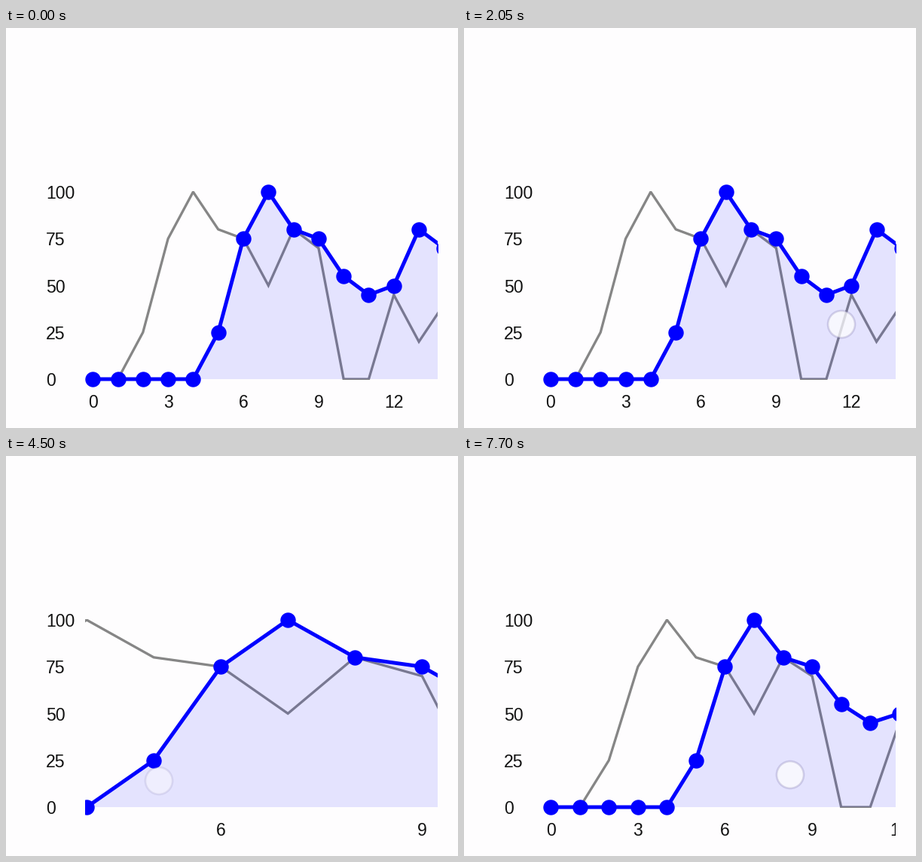
Write a matplotlib script that moves like this. It is 600 px wide and 532 px high and loops after 8000 ms.

```python
import numpy as np
import matplotlib.pyplot as plt
from matplotlib.animation import FuncAnimation
from matplotlib.patches import Circle, Polygon, Rectangle

W, H, DPI = 600, 532, 100
PX = 72 / DPI
STEP, LOOP = 50, 8000
LEFT, RIGHT, TOP, BASE = 105, 573, 218, 467
ORIGIN, GAP, INSET = 115.2, 33.3, 10
COAST = 150  # decay time of a fling, ms

BLUE = [0, 0, 0, 0, 0, 25, 75, 100, 80, 75, 55, 45,
        50, 80, 70, 25, 0, 0, 35, 60, 20, 40, 55, 30]
GREY = [0, 0, 25, 75, 100, 80, 75, 50, 80, 70, 0, 0,
        45, 20, 40, 75, 50, 75, 40, 20, 0, 0, 30, 10]
index = np.arange(len(BLUE))


def flick(u):
    return u * u


def smooth(u):
    return u * u * (3 - 2 * u)


class Touch:
    """A finger moving from a to b between two times."""

    def __init__(self, start, end, a, b, curve=flick, lift=None):
        self.start, self.end, self.curve = start, end, curve
        self.a, self.b = np.array(a, float), np.array(b, float)
        self.lift = lift or end

    def at(self, t):
        u = np.clip((t - self.start) / (self.end - self.start), 0, 1)
        return self.a + (self.b - self.a) * self.curve(u)

    def moved(self, t, stop):
        """Horizontal drag so far, plus the fling after release."""
        dx = self.at(t)[0] - self.a[0]
        speed = 2 * (self.b[0] - self.a[0]) / (self.end - self.start)
        free = max(0, min(t, stop) - self.end)
        return dx + speed * COAST * (1 - np.exp(-free / COAST))

    def level(self, t):
        return (np.clip((t - self.start + 50) / 100, 0, 1)
                * np.clip(1 - (t - self.lift) / 120, 0, 1))


SWIPES = [
    Touch(450, 850, (479, 411), (74, 400)),
    Touch(1500, 2100, (183.5, 397), (561.4, 393.5)),
    Touch(4050, 4450, (503.5, 424), (203, 432)),
    Touch(4900, 5400, (172, 428), (552, 418)),
]
PINCHES = [
    (Touch(3150, 3950, (292, 428), (104.5, 436), smooth),
     Touch(3150, 3950, (467, 397), (572.5, 384), smooth)),
    (Touch(5950, 7450, (125, 436), (246, 440), smooth),
     Touch(5950, 7450, (557, 392), (433, 424), smooth, lift=LOOP)),
]
TOUCHES = SWIPES + [touch for pair in PINCHES for touch in pair]


def zoom(t):
    z = 1
    for left, right in PINCHES:
        z *= (right.at(t)[0] - left.at(t)[0]) / (right.a[0] - left.a[0])
    return z


def pan(t):
    x = 0
    stops = [s.start for s in SWIPES[1:]] + [LOOP]
    for swipe, stop in zip(SWIPES, stops):
        limit = RIGHT - INSET - ORIGIN - index[-1] * GAP * zoom(swipe.start)
        x = np.clip(x + swipe.moved(t, stop), limit, 0)
    return x


def to_y(values):
    return BASE - np.array(values) * (BASE - TOP) / 100


fig = plt.figure(figsize=(W / DPI, H / DPI), dpi=DPI, facecolor="#fefdfe")
ax = fig.add_axes([0, 0, 1, 1])
ax.set(xlim=(0, W), ylim=(H, 0))
ax.axis("off")


def clip(artist, top=0, bottom=H):
    artist.set_clip_path(Rectangle((LEFT, top), RIGHT - LEFT, bottom - top,
                                   transform=ax.transData))
    return artist


def label(x, y, value, ha):
    return ax.text(x, y, str(value), ha=ha, va="baseline", color="#111111",
                   fontfamily="Liberation Sans", fontsize=23 * PX)


for v in range(0, 101, 25):
    label(53, to_y(v) + 9, v, "left")

blue_y, grey_y = to_y(BLUE), to_y(GREY)
grey, = ax.plot(index, grey_y, color="#868686", lw=3.3 * PX,
                solid_joinstyle="miter", zorder=1)
clip(grey, TOP - 1, BASE + 1)
area = clip(ax.add_patch(Polygon([(0, 0), (1, 1), (2, 0)], facecolor="#0000ff",
                                 alpha=.1, lw=0, zorder=2)))
blue, = ax.plot(index, blue_y, "-o", color="#0000ff", lw=5 * PX,
                ms=20.4 * PX, mew=0, solid_joinstyle="round",
                snap=False, zorder=3)
clip(blue)

ticks = []
for n in index[::3]:
    tick = label(0, 505, n, "center")
    tick.set_clip_on(True)
    ticks.append((n, clip(tick)))

fingers = []
for _ in TOUCHES:
    disc = Circle((0, 0), 18, facecolor="white", lw=0, zorder=5)
    ring = Circle((0, 0), 18, fill=False, edgecolor="#50468c",
                  lw=2.6 * PX, zorder=6)
    fingers.append((ax.add_patch(disc), ax.add_patch(ring)))


def draw(frame):
    t = frame * STEP
    x = ORIGIN + pan(t) + index * GAP * zoom(t)
    grey.set_xdata(x)
    blue.set_xdata(x)
    area.set_xy(np.vstack([np.column_stack([x, blue_y]),
                           [(x[-1], BASE), (x[0], BASE)]]))
    for n, tick in ticks:
        tick.set_x(x[n])
        tick.set_visible(LEFT - 20 < x[n] < RIGHT + 20)
    for touch, (disc, ring) in zip(TOUCHES, fingers):
        level = touch.level(t)
        for part, alpha in ((disc, .72), (ring, .2)):
            part.center = touch.at(t)
            part.set_alpha(alpha * level)
            part.set_visible(level > 0)
    return []


anim = FuncAnimation(fig, draw, frames=LOOP // STEP, interval=STEP,
                     repeat=True, repeat_delay=0, blit=False)
plt.show()
```
